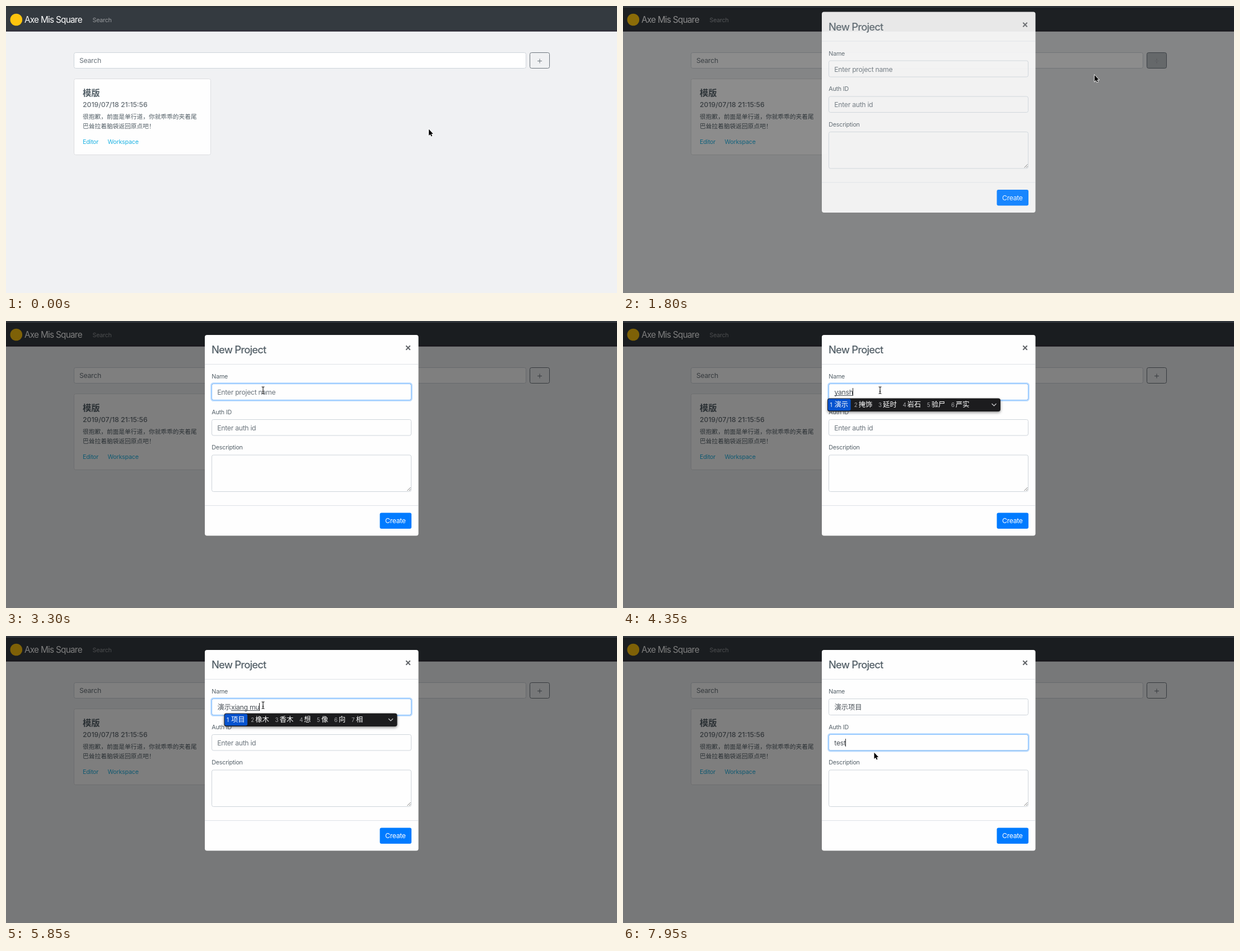
An HTML page with a canvas for the animation above (8 s loop, 1091 px wide and 514 px high).

```html
<!DOCTYPE html>
<html lang="zh-CN">
<head>
<meta charset="utf-8">
<style>
html, body { margin: 0; width: 100%; height: 100%; overflow: hidden; background: #f0f1f3; }
canvas { display: block; }
</style>
</head>
<body>
<canvas id="stage" width="1091" height="514"></canvas>
<script>
const c = document.getElementById('stage').getContext('2d');
const STEP = 150, LOOP = 8000;
const INK = '#546068', GREY = '#6c757d', INPUT_INK = '#495057', BORDER = '#ced4da';

// Pointer stops (step, x, y); each leg eases out
const POINTER = [[0, 754.5, 220], [3, 552, 205], [9, 952, 96], [11, 952, 96],
                 [12, 841.5, 123], [16, 459, 124], [52, 459, 124], [53, 448, 208]];

// One letter per step from `from`, replaced by the word at `until`
const WORDS = [
  { word: '演示', pinyin: 'yanshi', from: 25, until: 32,
    chars: '眼 严 言 烟 盐 演 颜 研', phrases: '演示 掩饰 延时 岩石 验尸 严实' },
  { word: '项目', pinyin: 'xiang mu', from: 32, until: 41,
    chars: '先 线 * 现 显 县 西安 闲', phrases: '项目 橡木 香木 想 像 向 相' }
];

const clamp = (v, lo = 0, hi = 1) => Math.min(hi, Math.max(lo, v));

function text(s, x, y, size, color, weight = 400, track = -.025) {
  const cjk = /[\u3000-\uffff]/.test(s);
  c.font = `${weight} ${size}px ${cjk ? '"Noto Sans CJK SC"' : 'Inter'}, sans-serif`;
  c.letterSpacing = (cjk ? 0 : track * size) + 'px';
  c.fillStyle = color;
  c.fillText(s, x, y);
  return c.measureText(s).width;
}

function rect(x, y, w, h, color) {
  c.fillStyle = color;
  c.fillRect(x, y, w, h);
}

function box(x, y, w, h, r, fill, stroke, line = 1) {
  c.beginPath();
  c.roundRect(x, y, w, h, r);
  if (fill) { c.fillStyle = fill; c.fill(); }
  if (stroke) { c.strokeStyle = stroke; c.lineWidth = line; c.stroke(); }
}

function lines(color, width, path) {
  c.strokeStyle = color;
  c.lineWidth = width;
  c.stroke(new Path2D(path));
}

function page(i) {
  rect(0, 0, 1091, 514, '#f0f1f3');
  rect(0, 0, 1091, 45.5, '#343a40');
  rect(0, 43, 1091, 2.5, '#302f38');
  c.beginPath();
  c.arc(18.3, 24.5, 10.8, 0, 7);
  c.fillStyle = '#fdc40e';
  c.fill();
  text('Axe Mis Square', 33, 30, 15.3, '#fff', 400, -.047);
  text('Search', 154.5, 29, 10.7, '#999c9f', 400, -.02);

  box(121.5, 83.5, 807, 28, 3, '#fff', BORDER);
  text('Search', 131, 102, 12.25, GREY);
  addButton(i < 8 ? 0 : clamp((12.3 - i) / .7));
  if (i === 11) box(934, 82, 38, 31, 4, null, 'rgba(108,117,125,.5)', 2.4);

  box(121.5, 130.5, 244, 136, 3, '#fefefe', '#dcdde0');
  text('模版', 137, 161, 15.3, INK, 700);
  text('2019/07/18 21:15:56', 137, 181, 12.25, '#626b72', 500, 0);
  text('很抱歉，前面是单行道，你就乖乖的夹着尾', 137, 202, 10.73, INK);
  text('巴耸拉着脑袋返回原点吧！', 137, 218.5, 10.73, INK);
  text('Editor', 137, 247, 10.7, '#1fb3e3', 400, -.02);
  text('Workspace', 181.5, 247, 10.7, '#1fb3e3', 400, -.02);
}

function addButton(hover) {
  const plus = 'M949 98.5h8M953 94.5v8';
  box(935.5, 83.5, 35, 28, 3, `rgba(108,117,125,${hover})`, GREY);
  lines(GREY, 1, plus);
  lines(`rgba(255,255,255,${hover})`, 1, plus);
}

function field(y, h, focus = 0) {
  box(367.5, y, 356, h, 3, null, BORDER);
  if (!focus) return;
  box(366.3, y - 1.2, 358.4, h + 2.4, 4, null, `rgba(0,123,255,${.25 * focus})`, 2.4);
  box(367.5, y, 356, h, 3, null, `rgba(128,189,255,${focus})`);
}

const caret = (x, y) => rect(Math.round(x), y, 1, 14, '#222');

function modal(i) {
  const authFocus = clamp((i - 44) / 2);
  const nameFocus = clamp((i - 18) / 2) - authFocus;
  box(355, 25, 381.5, 359.5, 4, '#fefefe');
  text('New Project', 367, 58, 18.4, INK, 500, -.045);
  lines('#606468', 2, 'M714.3 44.3l7.4 7.4m0 -7.4l-7.4 7.4');
  lines('#dee2e6', 1, 'M355 77.5h381M355 330.5h381');
  ['Name', 'Auth ID', 'Description'].forEach((s, k) =>
    text(s, 367.3, 103 + k * 63.6, 10.7, INK, 400, -.02));
  field(112.5, 29, nameFocus);
  field(176.5, 28.5, authFocus);
  field(240, 65.5);
  lines('#777', 1, 'M716.5 304l6 -6M720 304l2.5 -2.5');
  box(667.5, 343.5, 56.5, 28.5, 3, '#007bff');
  text('Create', 677, 362, 12.25, '#fff');

  const id = i < 48 ? '' : 'test'.slice(0, clamp(i - 47, 2, 4));
  const idWidth = text(id || 'Enter auth id', 377.3, 195.5, 12.25, id ? INPUT_INK : GREY);
  if (authFocus === 1) caret(377 + (id && idWidth), 184);
  nameText(i);
}

function nameText(i) {
  let x = 377.5;
  if (i < WORDS[0].from) text('Enter project name', 377.3, 132, 12.25, GREY);
  for (const { word, pinyin, from, until, chars, phrases } of WORDS) {
    if (i < from) break;
    if (i >= until) {
      x += text(word, x, 132, 12.25, INPUT_INK);
      continue;
    }
    const typed = pinyin.slice(0, i - from + 1).trim();
    const w = text(typed, x, 132, 12.25, INPUT_INK);
    lines(INPUT_INK, 1, `M${x} 133.5h${w}`);
    candidates(x - 12.5, (typed.length > 4 ? phrases : chars).split(' '));
    x += w;
  }
  const blinkOff = i >= 22 && i < 25;
  if (i >= 20 && i < 44 && !blinkOff) caret(x - .5, 120);
}

function candidates(left, options) {
  c.save();
  c.shadowColor = 'rgba(0,0,0,.45)';
  c.shadowBlur = 5;
  c.shadowOffsetY = 2;
  box(left, 138.5, 309, 23.5, 4, '#1c1c1e');
  c.restore();
  box(left + 1, 139.5, 16 + 12.3 * options[0].length, 21, 3, '#0653cf');
  let x = left + 4.5;
  options.forEach((s, k) => {
    text(k + 1, x, 153.5, 9.8, k ? '#a5a5a8' : '#fff');
    if (s === '*') {
      spool(x + 11);
      x += 36;
    } else {
      text(s, x + 8, 154, 12.3, '#fff');
      x += 18.7 + 12.3 * s.length;
    }
  });
  lines('#d0d0d2', 1.2, `M${left + 293.5} 148l4 4 4 -4`);
}

function spool(x) {
  box(x + 1.5, 144, 8, 11, 1, '#2b8aa5');
  box(x, 142, 11, 3, 1.5, '#d09a62');
  box(x, 154, 11, 3, 1.5, '#a96e3b');
}

function pointer(i) {
  const next = POINTER.findIndex(p => p[0] > i);
  const to = POINTER.at(next), from = next > 0 ? POINTER[next - 1] : to;
  const left = next > 0 ? (to[0] - i) / (to[0] - from[0]) : 0;
  const [x, y] = [1, 2].map(k => to[k] + (from[k] - to[k]) * left * left);
  const overName = i > 12 && x > 367 && x < 724 && y > 112 && y < 142;
  c.save();
  c.translate(x, y);
  if (overName) {
    const beam = 'M-2.5 -6h1.7l.8 1 .8 -1h1.7M0 -5v10M-2.5 6h1.7l.8 -1 .8 1h1.7M-1.5 2h3';
    lines('rgba(255,255,255,.7)', 2.4, beam);
    lines('#111', 1.1, beam);
  } else {
    const arrow = 'M.5 .8V12L3.1 9.7 4.8 13.5 6.5 12.8 4.9 9H8.2Z';
    lines('#fff', 1.5, arrow);
    c.fillStyle = '#000';
    c.fill(new Path2D(arrow));
  }
  c.restore();
}

function draw(now) {
  const i = Math.floor((now % LOOP) / STEP);
  page(i);
  if (i >= 12) {
    const opening = i === 12;
    const shown = opening ? .9 : 1;
    rect(0, 0, 1091, 514, `rgba(0,0,0,${.5 * shown})`);
    c.save();
    c.globalAlpha = shown;
    if (opening) c.translate(0, -14.5);
    modal(i);
    c.restore();
  }
  rect(0, 0, 1091, 3, '#30353a');
  pointer(i);
}

let begin;
function tick(now) {
  begin ??= now;
  draw(now - begin);
  requestAnimationFrame(tick);
}
requestAnimationFrame(tick);
</script>
</body>
</html>
```
